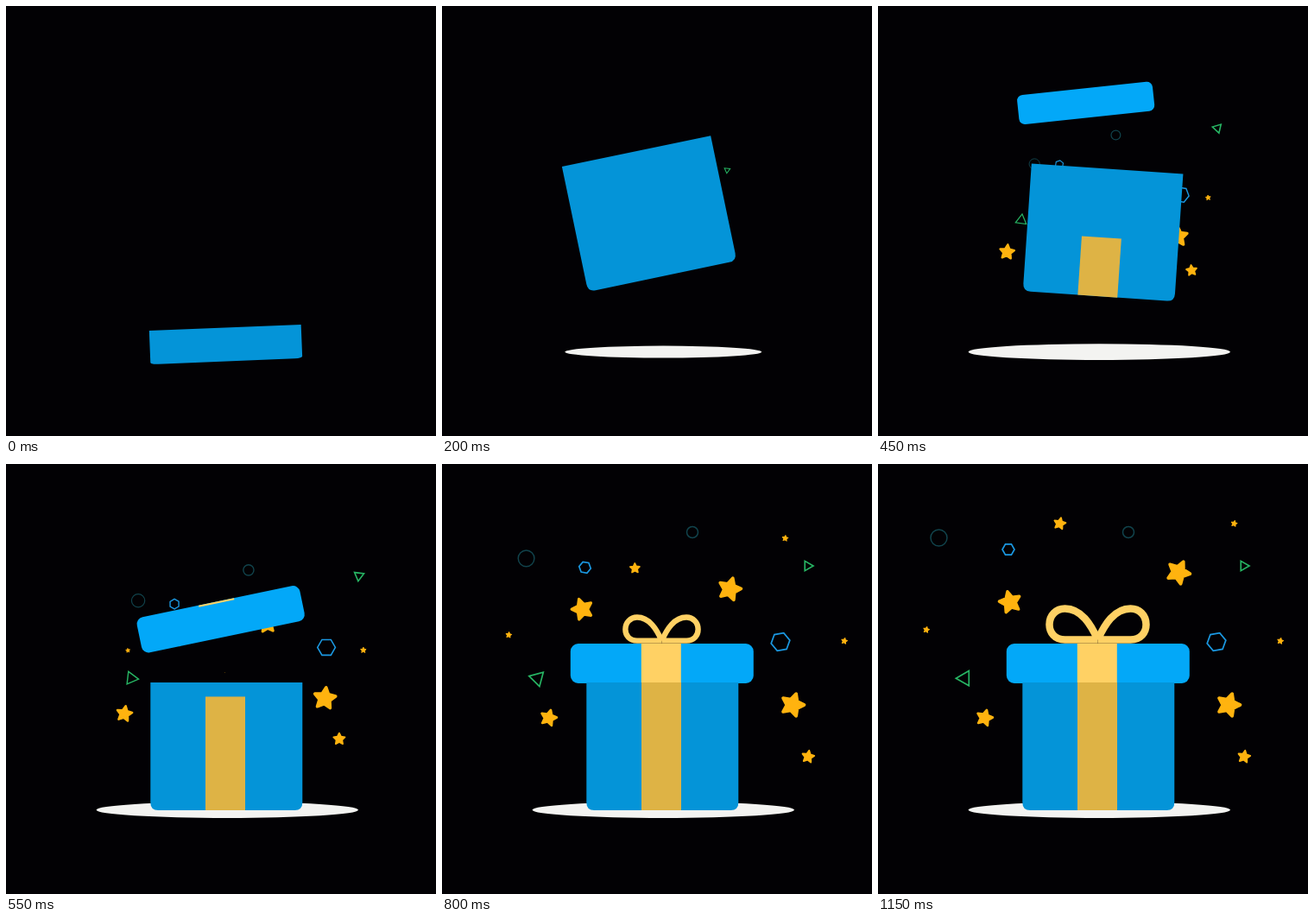
Write an HTML page that moves like this. It is 498x498 px and loops after 1200 ms.

```html
<!DOCTYPE html>
<html lang="en">
<head>
<meta charset="utf-8">
<title>Gift box</title>
<style>
html, body { margin: 0; width: 100%; height: 100%; overflow: hidden; background: #020104; }
svg { display: block; width: 100vw; height: 100vh; }

/* Every part is drawn around its own pivot. */
.floor { translate: 256.3px 400.6px; animation: grow 400ms cubic-bezier(.33, .67, .67, 1) both; }

.box { animation: jump 1200ms both, rock 1200ms both, rise 190ms both; }
.box, .box * , .lid * { animation-timing-function: linear; }
.band { animation: unrollUp 234ms 342ms both linear; }

.lid { animation: toss 1200ms both linear, tilt 1200ms both linear, grow 605ms both linear; }
.lidband { translate: 0 -23px; animation: unrollDown 160ms 542ms both linear; }

.bow { translate: 254.5px 208px; animation: puff 1200ms both linear; }

.bit {
  animation: fly var(--d) var(--s) both var(--ease),
             spin var(--d) var(--s) both var(--ease),
             grow var(--d) var(--s) both cubic-bezier(.33, 1, .67, 1);
}

@keyframes grow { from { scale: 0; } to { scale: 1; } }
@keyframes fly { from { translate: 255px 248px; } to { translate: var(--x) var(--y); } }
@keyframes spin { from { rotate: var(--r0); } to { rotate: var(--r1); } }
@keyframes unrollUp { from { scale: 1 0; } to { scale: 1 1; } }
@keyframes unrollDown { from { scale: 1 0; } to { scale: 1 1; } }

@keyframes rise { from { scale: 1 .264; } to { scale: 1 1; } }
@keyframes jump {
  0% { translate: 255.3px 411.5px; }
  16.667% { translate: 255.3px 313px; animation-timing-function: cubic-bezier(.33, .67, .67, 1); }
  29.167% { translate: 255.8px 278px; animation-timing-function: cubic-bezier(.33, 0, .67, .4); }
  41.667%, 100% { translate: 255.3px 401px; }
}
@keyframes rock {
  0% { rotate: -2.3deg; }
  16.667% { rotate: -11.8deg; animation-timing-function: cubic-bezier(.33, .1, .67, .9); }
  29.167% { rotate: 11.7deg; }
  41.667%, 100% { rotate: 0deg; }
}
@keyframes toss {
  0% { translate: 255px 395px; }
  16.667% { translate: 246px 240px; animation-timing-function: cubic-bezier(.33, .5, .67, .9); }
  29.167% { translate: 238px 89.8px; animation-timing-function: cubic-bezier(.33, 0, .67, .33); }
  50%, 100% { translate: 254.8px 231px; }
}
@keyframes tilt {
  0%, 29.167% { rotate: -.3deg; }
  45.833% { rotate: -11.8deg; }
  54.167%, 100% { rotate: 0deg; }
}
@keyframes puff {
  0%, 52.5% { scale: 0; }
  66.667% { scale: .752; animation-timing-function: cubic-bezier(.33, .67, .67, 1); }
  83.333% { scale: 1.1; animation-timing-function: cubic-bezier(.33, 0, .67, 1); }
  95.833%, 100% { scale: 1; }
}
</style>
</head>
<body>
<svg viewBox="0 0 498 498">
  <ellipse class="floor" rx="151.7" ry="9.3" fill="#f3f3f1"/>
  <g id="bits"></g>
  <g class="lid">
    <rect x="-106" y="-23" width="212" height="46" rx="9" fill="#03a8f8"/>
    <rect class="lidband" x="-24" width="46" height="46" fill="#ffd164"/>
  </g>
  <g class="box">
    <path d="M-88-148H88V-9Q88 0 79 0H-79Q-88 0-88-9Z" fill="#0494d8"/>
    <rect class="band" x="-24.3" y="-148" width="46" height="148" fill="#deb345"/>
  </g>
  <g class="bow" fill="none" stroke="#ffd164" stroke-width="8.5" stroke-linejoin="round">
    <path id="loop" d="M0-4.5H-38C-50-4.5-56-13-56-22C-56-33-48-40.5-38-40.5C-19-40.5-8-22 0-4.5"/>
    <use href="#loop" transform="scale(-1 1)"/>
  </g>
</svg>
<script>
const LOOP = 1200, STEP = 50;

// Polygon points; an inner ratio below 1 makes a star.
function points(n, r, inner) {
  const count = inner ? n * 2 : n;
  const list = [];
  for (let i = 0; i < count; i++) {
    const a = i / count * 2 * Math.PI - (inner ? Math.PI / 2 : 0);
    const d = inner && i % 2 ? r * inner : r;
    list.push((d * Math.cos(a)).toFixed(2) + ',' + (d * Math.sin(a)).toFixed(2));
  }
  return list.join(' ');
}

const outline = (n, color) => r =>
  `<polygon points="${points(n, r)}" fill="none" stroke="${color}" stroke-width="1.7"/>`;

const shapes = {
  star: r => `<polygon points="${points(5, r * .9, .5)}" fill="#ffb30f" stroke="#ffb30f"
    stroke-width="${r * .25}" stroke-linejoin="round"/>`,
  tri: outline(3, '#27b564'),
  hex: outline(6, '#1b98e2'),
  ring: r => `<circle r="${r}" fill="none" stroke="#11434c" stroke-width="1.5"/>`
};

const fast = 'cubic-bezier(.333,.667,.667,1)';
const soft = 'cubic-bezier(.333,.5,.667,.87)';

// shape, radius, end x, end y, start, duration, end angle, turn, easing
const bits = [
  ['ring', 9.5, 70.5, 85.5, 225, 775, 0, 0, soft],
  ['ring', 6.5, 290, 79, 167, 633, 0, 0, soft],
  ['hex', 7, 151, 99, 195, 805, 0, -70, soft],
  ['hex', 11, 392, 206, 160, 640, -10, -65, fast],
  ['tri', 6.5, 423.5, 118, 0, 782, 120, 260, fast],
  ['tri', 10, 100.3, 248.2, 143, 882, 180, -230, fast],
  ['star', 15, 348, 125.5, 270, 730, 25, 60, soft],
  ['star', 14, 153, 160, 345, 655, -14, 45, fast],
  ['star', 15, 406, 279, 137, 663, 18, 45, soft],
  ['star', 10.5, 123.5, 294, 0, 810, 15, 46, fast],
  ['star', 8, 424, 339, 98, 702, 10, 45, soft],
  ['star', 7.7, 210.5, 69, 540, 563, 12, 45, fast],
  ['star', 4, 412.5, 69, 353, 647, 12, 45, fast],
  ['star', 4, 466, 205, 144, 656, 12, 45, soft],
  ['star', 4, 56, 192, 286, 764, 12, 45, fast]
];

document.getElementById('bits').innerHTML = bits.map(
  ([shape, r, x, y, start, dur, angle, turn, ease]) =>
    `<g class="bit" style="--x:${x}px;--y:${y}px;--s:${start}ms;--d:${dur}ms;` +
    `--r0:${angle - turn}deg;--r1:${angle}deg;--ease:${ease}">${shapes[shape](r)}</g>`
).join('');

// Advance all keyframes together in 50 ms steps.
const anims = document.getAnimations();
anims.forEach(a => a.pause());
let begin;

function tick(now) {
  if (begin === undefined) begin = now;
  const t = Math.floor((now - begin) % LOOP / STEP) * STEP;
  for (const a of anims) a.currentTime = t;
  requestAnimationFrame(tick);
}
requestAnimationFrame(tick);
</script>
</body>
</html>
```
